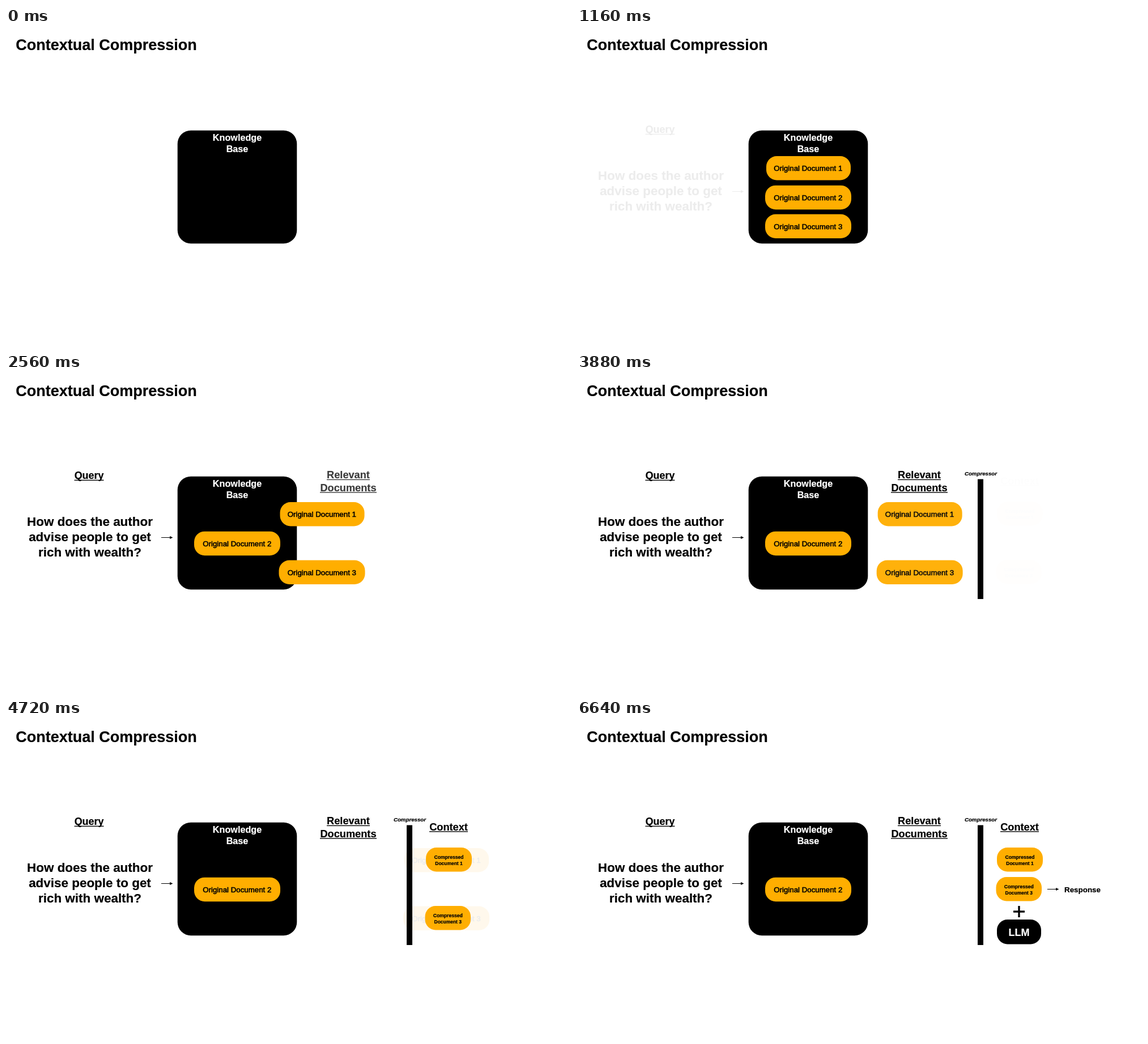
An HTML page for the animation above (8 s loop, 997x561 px).

```html
<!DOCTYPE html>
<html lang="en">
<head>
<meta charset="utf-8">
<title>Contextual Compression</title>
<style>
  html, body { margin: 0; width: 100%; height: 100%; overflow: hidden; background: #fff; }
  svg { display: block; width: 997px; height: 561px; }
  text {
    font-family: "Liberation Sans", Arial, sans-serif; font-weight: bold; text-anchor: middle;
    color: #000; fill: currentColor; stroke: currentColor; stroke-width: .2px;
  }
  .medium { font-weight: normal; stroke-width: .55px; }
  .italic { font-style: italic; }
  .white { color: #fff; }
</style>
</head>
<body>
<svg id="stage" viewBox="0 0 997 561"></svg>
<script>
const LOOP = 8000, STEP = 40, FADE = 690, MOVE = 950;
const ORANGE = "#ffae00";
const stage = document.getElementById("stage");

function add(parent, tag, attrs = {}, content = "") {
  const node = document.createElementNS("http://www.w3.org/2000/svg", tag);
  for (const name in attrs) node.setAttribute(name, attrs[name]);
  node.textContent = content;
  return parent.appendChild(node);
}
const group = () => add(stage, "g");
const label = (parent, content, x, y, size, cls = "") =>
  add(parent, "text", { x, y, "font-size": size, class: cls }, content);
const box = (parent, x, y, width, height, rx = 0, fill = "#000") =>
  add(parent, "rect", { x, y, width, height, rx, fill });

function heading(parent, content, x, y, width, size = 18.2) {
  label(parent, content, x, y, size);
  box(parent, x - width / 2, y + 1.7, width, 1.4);
}
function arrow(parent, x, y) {
  box(parent, x, y - 0.5, 17, 1);
  add(parent, "path", { d: `M${x + 15} ${y - 2.5}l5.5 2.5l-5.5 2.5z` });
}
function originalDoc(number, x, y, width) {
  const doc = group();
  box(doc, x, y, width, 42.5, 18.5, ORANGE);
  label(doc, "Original Document " + number, 407.8, y + 26, 13.3, "medium");
  return doc;
}
function compressedDoc(number, x, y, width) {
  const doc = group(), middle = x + width / 2;
  box(doc, x, y, width, 42.5, 18.5, ORANGE);
  label(doc, "Compressed", middle, y + 19.5, 8.6);
  label(doc, "Document " + number, middle, y + 30.5, 8.45);
  return doc;
}

// Scene, back to front
label(stage, "Contextual Compression", 177, 38.5, 27);
box(stage, 302.7, 180.7, 210.6, 199.5, 23.5);
label(stage, "Knowledge", 408, 199, 16.2, "white");
label(stage, "Base", 408, 219, 16.2, "white");

const query = group();
heading(query, "Query", 146.5, 185, 52, 17.9);
["How does the author", "advise people to get", "rich with wealth?"]
  .forEach((line, i) => label(query, line, 148, 267.5 + 27 * i, 22.45));
arrow(query, 274, 288.5);

const relevant = group();
heading(relevant, "Relevant", 604, 184, 76);
heading(relevant, "Documents", 604, 206.5, 100);

const llm = group();
box(llm, 741, 352, 78, 43.5, 18.5);
label(llm, "LLM", 780, 380.5, 18, "white");
box(llm, 770, 336.3, 20, 3.4);
box(llm, 778.3, 328, 3.4, 20);

const doc2 = originalDoc(2, 332, 277.7, 152);
const doc1 = originalDoc(1, 334, 226, 149);
const doc3 = originalDoc(3, 332, 328.5, 152);

const compressor = group();
label(compressor, "Compressor", 712.5, 178.5, 9.7, "italic");
box(compressor, 707, 185.5, 10, 211.5);

const context = group();
heading(context, "Context", 781, 194.5, 68);
const short1 = compressedDoc(1, 741, 225, 81);
const short3 = compressedDoc(3, 739.5, 277, 80.5);

const response = group();
arrow(response, 830, 298.5);
label(response, "Response", 892, 304, 13.4);

const progress = (t, start, duration) => Math.min(1, Math.max(0, (t - start) / duration));
const ease = u => (1 - Math.cos(Math.PI * u)) / 2;
const show = (alpha, ...nodes) => nodes.forEach(node => node.setAttribute("opacity", alpha));
const shift = (x, y, ...nodes) =>
  nodes.forEach(node => node.setAttribute("transform", `translate(${x} ${y})`));

function render(t) {
  const docsIn = progress(t, 150, FADE);
  const retrieve = ease(progress(t, 1917, MOVE));
  const pass = progress(t, 3837, MOVE);
  const join = ease(progress(t, 4797, MOVE));

  show(docsIn, doc2);
  show(docsIn * (1 - pass), doc1, doc3);
  shift(195.8 * retrieve + 175.5 * ease(pass), 0, doc1, doc3);
  show(progress(t, 1110, FADE), query);
  show(retrieve, relevant);
  show(progress(t, 3030, FADE), compressor);
  show(ease(pass), context, short1, short3);
  shift(0, 51 * (1 - join), short3);
  show(join, llm);
  show(progress(t, 5910, FADE), response);
}

function tick() {
  const t = performance.now() % LOOP;
  render(Math.floor(t / STEP) * STEP);
  requestAnimationFrame(tick);
}
tick();
</script>
</body>
</html>
```
